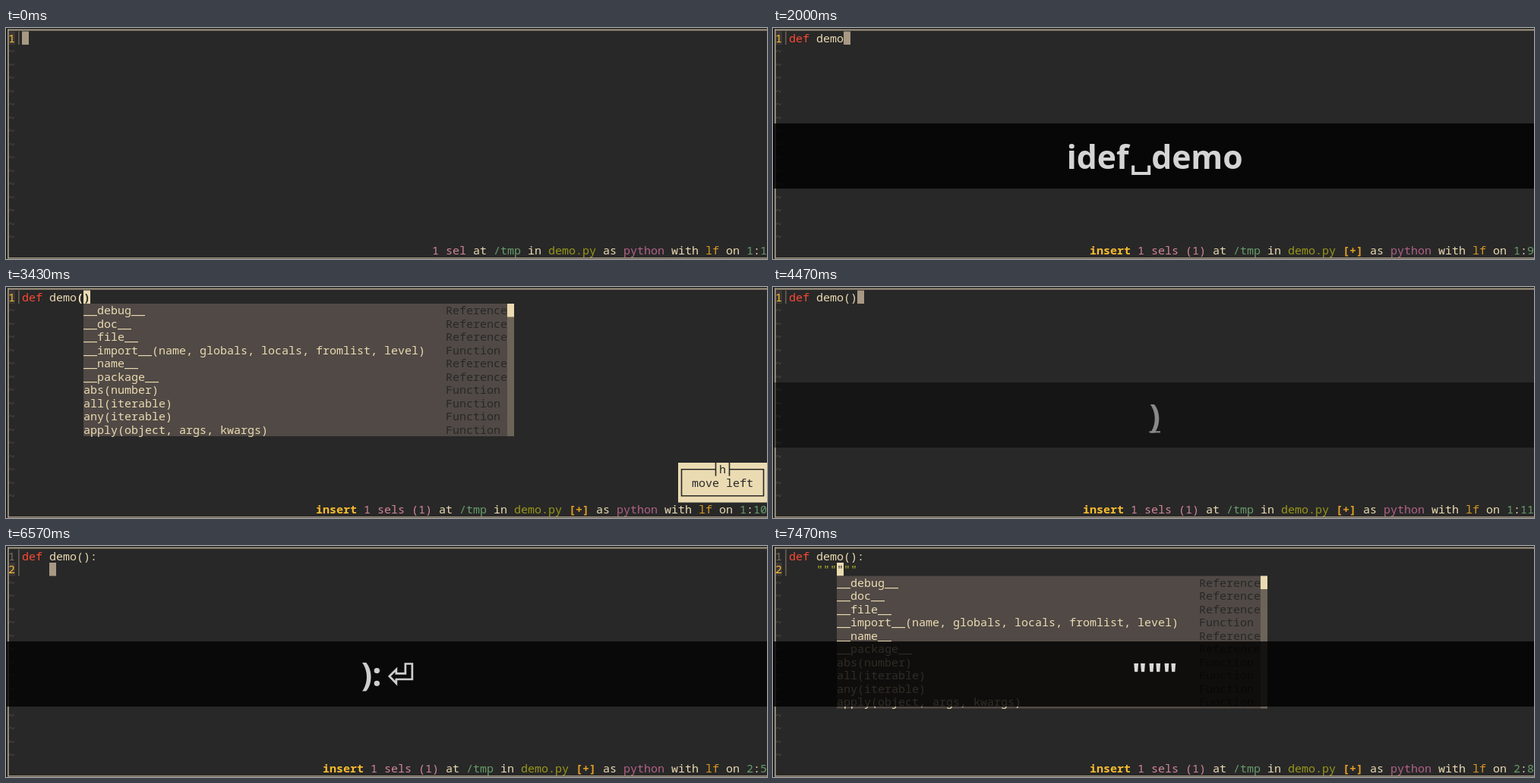
Recreate the animation shown at these times as an HTML page with a canvas. Size 1002x305 px, loop 8000 ms.

```html
<!DOCTYPE html>
<html lang="en">
<head>
<meta charset="utf-8">
<title>Editor completion demo</title>
<style>
  html, body { margin: 0; width: 100%; height: 100%; overflow: hidden; background: #282828; }
  canvas { position: absolute; left: 0; display: block; }
  #editor { top: 0; }
  #keys { top: 126px; }
</style>
</head>
<body>
<canvas id="editor" width="1002" height="305"></canvas>
<canvas id="keys" width="1002" height="86"></canvas>
<script>
const LOOP = 8000;
const CELL = 9, ROW = 17.5, LEFT = 3, TEXT_LEFT = 21, TOP = 4.5, WIDTH = 1002;
const MONO = '15px "Noto Sans Mono", monospace';
const KEY_FONT = 'bold 42.67px "Noto Sans", "Open Sans", sans-serif';
const C = {
  bg: '#282828', fg: '#ebdbb2', grey: '#a89984', dim: '#7c6f64', pad: '#504945',
  line: '#3c3836', red: '#fb4934', yellow: '#fabd2f', string: '#b8bb26', pink: '#d3869b',
  aqua: '#689d6a', olive: '#98971a', purple: '#b16286', orange: '#d79921', mark: '#e5a024'
};

const LETTERS = {
  width: 31, thumb: 4, kind: 22,
  items: [['def', 'Keyword'], ['del', 'Keyword'],
    ['delattr(object, name)', 'Function'], ['DeprecationWarning', 'Class']]
};
const KEYWORD = { width: 12, thumb: 1, kind: 4, items: [['def', 'Keyword']] };
const ALL = {
  width: 63, thumb: 1, kind: 53,
  items: [['__debug__', 'Reference'], ['__doc__', 'Reference'], ['__file__', 'Reference'],
    ['__import__(name, globals, locals, fromlist, level)', 'Function'],
    ['__name__', 'Reference'], ['__package__', 'Reference'], ['abs(number)', 'Function'],
    ['all(iterable)', 'Function'], ['any(iterable)', 'Function'],
    ['apply(object, args, kwargs)', 'Function']]
};

// [time, lines, cursor column on the last line, menu, menu column, hint shown]
const HEAD = 'def demo():';
const EDITS = [
  [0, [''], 0],
  [1100, ['de'], 2, LETTERS, 0],
  [1200, ['def'], 3, KEYWORD, 0],
  [1400, ['def '], 4],
  [1500, ['def d'], 5],
  [1600, ['def de'], 6],
  [1800, ['def dem'], 7],
  [1870, ['def demo'], 8],
  [2330, ['def demo()'], 9, null, 0, true],
  [2470, ['def demo()'], 9, ALL, 9, true],
  [4470, ['def demo()'], 10],
  [4730, [HEAD], 11],
  [4870, [HEAD], 11, ALL, 11],
  [5070, [HEAD, ''], 0],
  [5130, [HEAD, '    '], 4],
  [7000, [HEAD, '    ""'], 5],
  [7300, [HEAD, '    ""'], 6],
  [7330, [HEAD, '    """"""'], 7],
  [7470, [HEAD, '    """"""'], 7, ALL, 7]
];

// [time, keys, number of underlined keys]
const KEYS = [
  [0, '', 0], [670, 'i', 1], [830, 'i', 0], [1100, 'ide', 2], [1200, 'idef', 1],
  [1330, 'idef', 0], [1400, 'idef␣', 1], [1500, 'idef␣d', 1], [1600, 'idef␣de', 1],
  [1730, 'idef␣de', 0], [1800, 'idef␣dem', 1], [1870, 'idef␣demo', 2],
  [2000, 'idef␣demo', 0], [2330, 'idef␣demo(', 1], [2500, 'idef␣demo(', 0],
  [4470, ')', 1], [4500, ')', 0], [4730, '):', 1], [4900, '):', 0],
  [5070, '): ⏎', 1], [5270, '): ⏎', 0],
  [7000, '"', 1], [7100, '"', 0], [7300, '""', 1], [7330, '"""', 2], [7470, '"""', 0]
];

const FADES = [
  [0, 0], [670, .2], [700, .4], [730, .6], [770, .8],
  [3330, .76], [3370, .5], [3400, .25], [3430, 0],
  [4470, .45], [4500, .8],
  [6570, .77], [6600, .5], [6630, .25], [6670, 0],
  [7000, .3], [7030, .6], [7100, .8]
];

const editor = document.getElementById('editor').getContext('2d');
const keyCanvas = document.getElementById('keys');
const keys = keyCanvas.getContext('2d');

const at = (steps, t) => steps.findLast(step => step[0] <= t);
const rowTop = row => TOP + row * ROW;

function box(x, y, w, h, color) {
  editor.fillStyle = color;
  editor.fillRect(x, y, w, h);
}

function write(text, x, row, color, bold) {
  editor.font = (bold ? 'bold ' : '') + MONO;
  editor.fillStyle = color;
  editor.fillText(text, x, rowTop(row) + 14);
}

const shade = (() => {
  const tile = document.createElement('canvas');
  tile.width = tile.height = 2;
  const g = tile.getContext('2d');
  g.fillStyle = '#8a7f6c';
  g.fillRect(0, 0, 1, 1);
  g.fillRect(1, 1, 1, 1);
  return editor.createPattern(tile, 'repeat');
})();

function drawFrame() {
  box(0, 0, WIDTH, 305, C.bg);
  box(0, 0, 2, 305, '#1d2021');
  box(0, 0, WIDTH, 1.5, '#1d2021');
  box(2, 1.5, WIDTH, 2, C.grey);
  box(2, 1.5, 1.7, 303, C.grey);
  box(2, 303, WIDTH, 1.5, C.grey);
}

function drawLine(text, row, current) {
  if (current) box(LEFT + 1, rowTop(row), CELL - 1, ROW, C.line);
  write(row + 1, LEFT, row, current ? C.yellow : C.dim);
  box(16.3, rowTop(row), 1.2, ROW, C.dim);
  write(text, TEXT_LEFT, row, text.includes('"') ? C.string : C.fg);
  if (/^def\b/.test(text)) {
    box(TEXT_LEFT, rowTop(row), 3 * CELL, ROW, C.bg);
    write('def', TEXT_LEFT, row, C.red);
  }
}

function drawCursor(text, row, col) {
  const x = TEXT_LEFT + col * CELL, under = text[col];
  box(x, rowTop(row), CELL, ROW, under ? C.fg : C.grey);
  if (!under) return;
  const paren = under === ')';
  write(under, x, row, C.bg, paren);
  if (paren) write('(', x - CELL, row, C.fg, true);
}

function drawMenu(menu, col, row) {
  const x = TEXT_LEFT + col * CELL, y = rowTop(row);
  const h = menu.items.length * ROW, bar = x + (menu.width - 1) * CELL;
  box(x, y, menu.width * CELL, h, C.pad);
  menu.items.forEach(([name, kind], i) => {
    write(name, x, row + i, C.fg);
    write(kind, x + menu.kind * CELL, row + i, C.bg);
  });
  box(bar, y, CELL, h, shade);
  box(bar, y, CELL, menu.thumb * ROW, C.fg);
}

function drawHint() {
  const x = WIDTH - 13 * CELL, y = rowTop(13);
  box(x, y, 13 * CELL, 3 * ROW, C.fg);
  const l = x + 4.5, r = WIDTH - 4.5, t = y + ROW / 2, b = y + 2.5 * ROW;
  const a = x + 5.5 * CELL, z = x + 7.5 * CELL;
  editor.strokeStyle = C.bg;
  editor.lineWidth = 1.6;
  editor.beginPath();
  editor.moveTo(a, t);
  for (const p of [[l, t], [l, b], [r, b], [r, t], [z, t]]) editor.lineTo(...p);
  for (const side of [a, z]) {
    editor.moveTo(side, y);
    editor.lineTo(side, y + ROW);
  }
  editor.stroke();
  write('h', x + 6 * CELL, 13, C.bg);
  write('move left', x + 2 * CELL, 14, C.bg);
}

function drawStatus(insert, changed, row, col) {
  const parts = [
    ...(insert ? [['insert ', C.yellow, true], ['1 sels (1) ', C.pink]] : [['1 sel ', C.pink]]),
    ['at ', C.fg], ['/tmp ', C.aqua], ['in ', C.fg], ['demo.py ', C.olive],
    ...(changed ? [['[+] ', C.mark, true]] : []),
    ['as ', C.fg], ['python ', C.purple], ['with ', C.fg], ['lf ', C.orange], ['on ', C.fg],
    [String(row + 1), C.aqua], [':', C.fg], [String(col + 1), C.aqua]
  ];
  let x = WIDTH - CELL * parts.reduce((n, p) => n + p[0].length, 0);
  for (const [text, color, bold] of parts) {
    write(text, x, 16, color, bold);
    x += text.length * CELL;
  }
}

function drawEditor(t) {
  const [, lines, col, menu, menuCol, hint] = at(EDITS, t);
  const row = lines.length - 1;
  drawFrame();
  for (let i = lines.length; i < 16; i++) write('~', LEFT, i, C.pad);
  lines.forEach((text, i) => drawLine(text, i, i === row));
  drawCursor(lines[row], row, col);
  if (menu) drawMenu(menu, menuCol, row + 1);
  if (hint) drawHint();
  drawStatus(t >= 670, t >= 1100, row, col);
}

const SYMBOLS = {
  ' ': { width: 7.5 },
  '␣': { width: 29.7, weight: 4, points: [[5.7, -4.5], [5.7, 6], [26.7, 6], [26.7, -4.5]] },
  '⏎': {
    width: 35.8, weight: 2.7, closed: true,
    points: [[3, -13], [12, -22], [12, -16.7], [24, -16.7], [24, -29.5],
      [33, -29.5], [33, -9], [12, -9], [12, -3.7]]
  }
};
const pieces = text => text.split(/([ ␣⏎])/).filter(Boolean);
const pieceWidth = p => SYMBOLS[p] ? SYMBOLS[p].width : keys.measureText(p).width;
const keyWidth = text => pieces(text).reduce((w, p) => w + pieceWidth(p), 0);

function drawSymbol({ points, weight, closed }, x, y) {
  if (!points) return;
  keys.lineWidth = weight;
  keys.beginPath();
  for (const [px, py] of points) keys.lineTo(x + px, y + py);
  if (closed) keys.closePath();
  keys.stroke();
}

function drawKeys(t) {
  const [, text, recent] = at(KEYS, t);
  keyCanvas.style.opacity = at(FADES, t)[1];
  keys.fillStyle = '#000';
  keys.fillRect(0, 0, WIDTH, 86);
  keys.fillStyle = keys.strokeStyle = '#fff';
  keys.font = KEY_FONT;
  const right = 502.7 + keyWidth(text) / 2;
  const base = text.includes('⏎') ? 59 : 60;
  let x = right - keyWidth(text);
  for (const p of pieces(text)) {
    if (SYMBOLS[p]) drawSymbol(SYMBOLS[p], x, base);
    else keys.fillText(p, x, base);
    x += pieceWidth(p);
  }
  if (recent) {
    const w = keyWidth(text.slice(-recent));
    keys.fillRect(right - w, base === 60 ? 64.3 : 62.3, w, 2.1);
  }
}

function draw() {
  const t = performance.now() % LOOP;
  drawEditor(t);
  drawKeys(t);
  requestAnimationFrame(draw);
}
draw();
</script>
</body>
</html>
```
